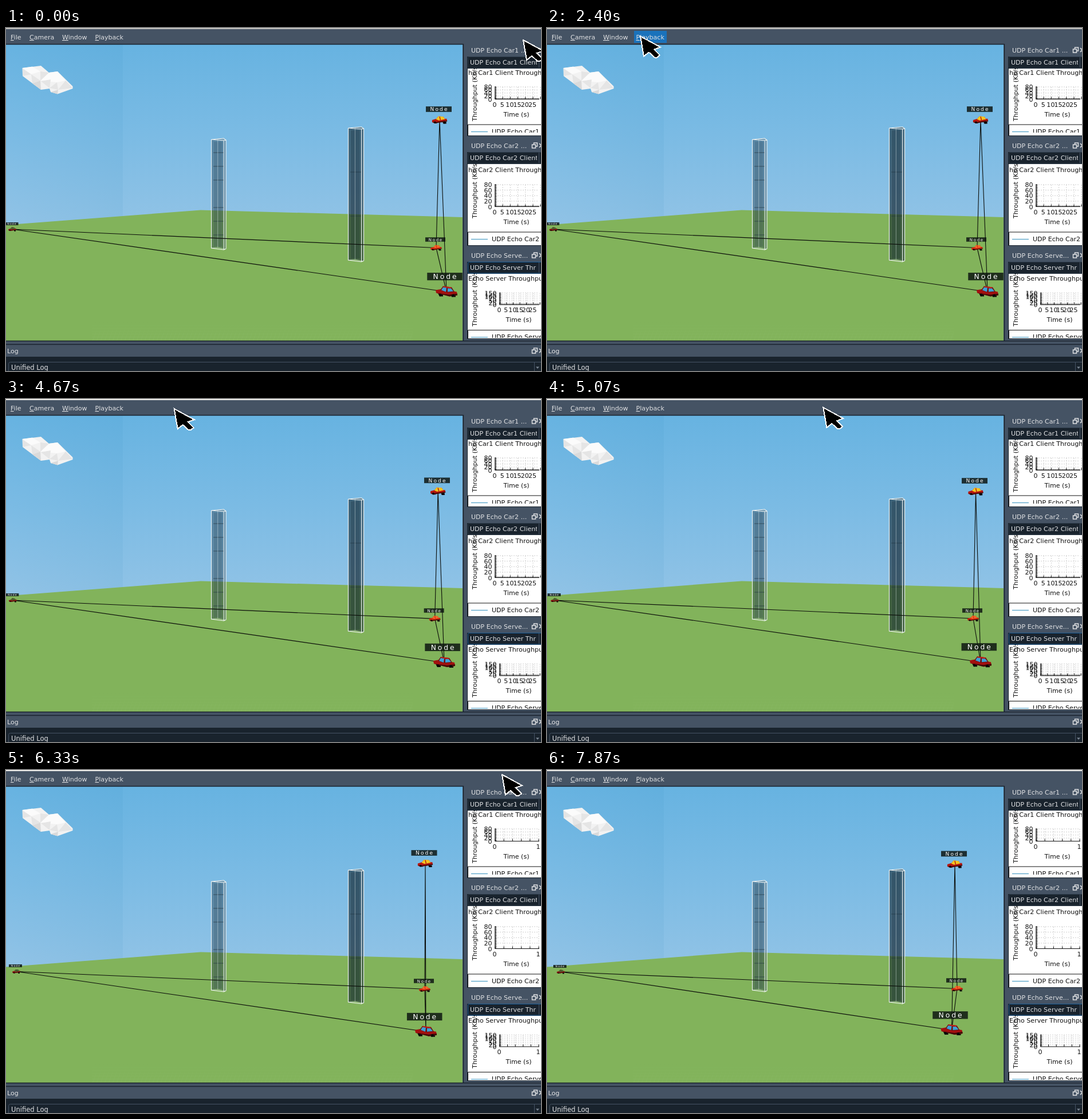
These frames come from a looping animation (934 by 600 pixels, 8 s). An HTML page:

```html
<!DOCTYPE html>
<html lang="en">
<head>
<meta charset="utf-8">
<title>Network simulation playback</title>
<style>
html, body { margin: 0; width: 100%; height: 100%; overflow: hidden; background: #455364; }
svg { display: block; }
text { font: 11.05px "DejaVu Sans", Verdana, sans-serif; white-space: pre; }
.ui text { fill: #e0e1e3; }
.chart text { fill: #111; }
.u { text-decoration: underline; }
</style>
</head>
<body>
<svg id="stage" width="934" height="600" viewBox="0 0 934 600">
  <defs>
    <linearGradient id="sky" x1="0" y1="29" x2="0" y2="345" gradientUnits="userSpaceOnUse">
      <stop offset="0" stop-color="#67b3e1"/><stop offset=".5" stop-color="#7bbbe4"/><stop offset="1" stop-color="#91c3e6"/>
    </linearGradient>
    <linearGradient id="side" x1="0" y1="0" x2="1" y2="0">
      <stop offset="0" stop-color="#1f7fb5" stop-opacity="0"/><stop offset="1" stop-color="#1f7fb5" stop-opacity=".07"/>
    </linearGradient>
    <linearGradient id="fade" x1="0" y1="0" x2="0" y2="1">
      <stop offset="0" stop-color="#fff" stop-opacity="0"/><stop offset="1" stop-color="#fff"/>
    </linearGradient>
    <pattern id="mesh" width="7" height="5" patternUnits="userSpaceOnUse" patternTransform="skewX(-20)">
      <path d="M0 0H7M0 0V5" fill="none" stroke="#98c276" stroke-width=".7"/>
    </pattern>
    <mask id="soft"><rect x="150" y="515" width="560" height="32" fill="url(#fade)"/></mask>
    <clipPath id="viewClip"><rect y="29" width="797" height="518"/></clipPath>
  </defs>

  <rect width="934" height="600" fill="#455364"/>
  <rect id="edge" width="934" height="2"/>

  <g clip-path="url(#viewClip)">
    <rect y="29" width="797" height="330" fill="url(#sky)"/>
    <rect y="29" width="204" height="320" fill="url(#side)"/>
    <path d="M0 344.5L340 318.5L797 331V547H0Z" fill="#82b35b"/>
    <rect x="150" y="515" width="560" height="32" fill="url(#mesh)" mask="url(#soft)" opacity=".5"/>
    <g id="cloud"></g>
    <g id="towers"></g>
    <path id="links" fill="none" stroke="#0a0c08" stroke-width="1.1"/>
    <g id="cars"></g>
  </g>

  <path d="M0 28.5H798.5V548M0 547.5H934M0 553.5H934" fill="none" stroke="#19232d" stroke-width="1.3"/>
  <g id="docks"></g>

  <g class="ui">
    <rect y="575" width="934" height="25" fill="#19232d"/>
    <rect x="4.5" y="584.5" width="940" height="30" rx="3" fill="#19232d" stroke="#455364"/>
    <path d="M922.5 585V600" stroke="#455364"/>
    <path d="M925 592.5H931L928 596Z" fill="#7b8794"/>
    <text x="2" y="569">Log</text>
    <text x="9" y="598" style="font-size:11.5px">Unified Log</text>
    <g id="logIcons"></g>
  </g>

  <g class="ui">
    <rect id="hot" x="152" width="57" height="21" fill="#1a72bb"/>
    <text x="8" y="20"><tspan class="u">F</tspan>ile</text>
    <text x="41" y="20"><tspan class="u">C</tspan>amera</text>
    <text x="98" y="20"><tspan class="u">W</tspan>indow</text>
    <text id="playback" x="155.5" y="20"><tspan class="u">P</tspan>layback</text>
    <g id="menu">
      <rect id="item" x="152" y="27" width="125" height="20"/>
      <text x="177" y="41">Play/Pause</text><text x="248" y="41">P</text>
    </g>
  </g>

  <path id="big" d="M0 0L6 35L15 28L25 37L29 37L34 33L24 23L35 19Z" fill="#000" stroke="#fff" stroke-width="2" shape-rendering="crispEdges"/>
  <g id="small">
    <path d="M3 3V28L9 23L14 32L18 30L14 21H22Z" fill="#000" opacity=".25"/>
    <path d="M0 0V25L6 20L11 30L15.500 28L11 18.500H19Z" fill="#464c53" stroke="#b3b8bd" stroke-width="1.200"/>
  </g>
</svg>

<script>
const $ = id => document.getElementById(id);
const show = (el, on) => el.setAttribute('visibility', on ? 'visible' : 'hidden');
const place = (el, x, y) => el.setAttribute('transform', `translate(${x.toFixed(2)} ${y.toFixed(2)})`);
const path = (d, fill, more = '') => `<path d="${d}" fill="${fill}" ${more}/>`;
const label = (x, y, s, anchor = 'start') => `<text x="${x}" y="${y}" text-anchor="${anchor}">${s}</text>`;
const range = n => Array.from({ length: n }, (_, i) => i);

// Rows are [key, ...values]; linear between rows, held at both ends.
function sample(rows, t) {
  let i = 0;
  while (i < rows.length - 2 && t >= rows[i + 1][0]) i++;
  const [a, b] = [rows[i], rows[i + 1]];
  const p = Math.min(1, Math.max(0, (t - a[0]) / (b[0] - a[0])));
  return a.slice(1).map((v, j) => v + (b[j + 1] - v) * p);
}

/* ---- scenery ---- */
$('cloud').innerHTML =
  path('M28.5 70L61 66L75 78L90 76L116.500 102V106L90 115.500L78 112L76 106L61 108L29 84Z', '#f2f2f2') +
  path('M28.5 70L44 81L60 76L46 67.500Z M60 92L75 78L90 76L104 92L89 95Z', '#fbfbfb') +
  path('M29 71V84L44 81Z M44 81L60 92L46 97Z M60 76L75 78L60 92Z M61 93L78 90L76 105Z M76 105L89 95L91 108Z M91 108L104 92L116 105Z', '#e5e5e5') +
  path('M46 97L60 92L61 108Z M78 112L91 108L90 115.500Z', '#dadada');

function tower(x, r, top, base, tint, floors) {
  const w = r - x, m = x + w * .45, n = x + w * .86;
  const slab = floors.map(y => `M${x + 4} ${y}H${r - 4}`).join('');
  return path(`M${x} ${top + 2}L${r - 4} ${top}L${r} ${top + 3}V${base}L${m} ${base - 3}L${x} ${base - 2}Z`, tint) +
    path(`M${x + 5} ${top + 6}H${r - 7}V${base - 5}H${x + 5}Z`, tint, 'opacity=".4"') +
    path(slab, 'none', 'stroke="#1f3340" stroke-width="1" opacity=".65"') +
    path(`M${m} ${top + 1}V${base - 3}L${x} ${base - 2}M${m} ${base - 3}L${r} ${base}M${m} ${top + 1}L${r} ${top + 3}`, 'none', 'stroke="#e8f0f2" stroke-width=".8" opacity=".55"') +
    path(`M${x + .5} ${top + 2}L${r - 4} ${top}L${r} ${top + 3}L${n} ${top + 4}ZV${base - 2}L${n} ${base + 1}L${r} ${base - 1}V${top + 3}M${n} ${top + 4}V${base + 1}`, 'none', 'stroke="#f0f4f4" stroke-width="1.1"');
}
$('towers').innerHTML =
  tower(358, 384, 193, 387, 'rgba(38,62,78,.42)', [218, 242, 266, 314, 338, 362]) +
  tower(597, 624.5, 173, 408, 'rgba(20,38,48,.58)', [252, 329]);

/* ---- cars: rows are [step, label x, label y, car x, car y] ---- */
const cars = [
  { w: 23, len: 14, body: '#8d1712', glass: '#3f6a35', at: [[-3, 10, 342.5, 11, 352], [0, 12.5, 342.5, 13.5, 352], [3, 14.5, 342.5, 15.5, 352], [6, 16.5, 342.5, 18, 352.5], [13, 22.5, 343.5, 24, 353]] },
  { w: 45, len: 27, body: '#b8160e', glass: '#f3c522', at: [[-3, 755.5, 142, 757, 161], [0, 746.5, 143, 748.5, 162], [3, 738.5, 144, 740, 162.5], [6, 730, 145, 732, 163.5], [13, 710.5, 146.5, 712, 165]] },
  { w: 35, len: 20, body: '#d8290f', glass: '#f0682a', at: [[-3, 749.5, 370, 751, 384.5], [0, 742.5, 370, 744, 384], [3, 735.5, 369.5, 737, 383.7], [6, 729.5, 369, 731, 383.3], [13, 714.5, 368, 716, 382.5]] },
  { w: 61.5, len: 37, body: '#a3100f', glass: '#3c9fd8', at: [[-3, 766, 434.7, 769, 461.5], [0, 754.3, 433.7, 757, 460.3], [3, 743, 432.7, 745, 459], [6, 730.7, 431.5, 733, 457.7], [13, 704, 428.8, 706.5, 455]] }
];

function carShape({ len, body, glass }) {
  const near = len > 30;
  // The near car faces left; the others are seen nearly side-on.
  const hull = near ? 'M-19 -3L-8 -5L18 0L19 6L5 8L-18 2Z' : 'M-18 0L-8 -3L17 -3L18 3L-12 8L-18 5Z';
  const cabin = near ? 'M-11 -3L-6 -10L9 -8L14 0L1 1Z' : 'M-9 -2L-3 -9L9 -8L13 -2L-2 1Z';
  const pane = near ? 'M-9 -3L-6 -8L0 -7L-1 0Z M2 -6L8 -6L12 -1L2 0Z' : cabin;
  return `<g transform="scale(${len / 37})">` +
    path('M-15 2H-6V8H-12Z M7 4H16V9H9Z', '#120c0c') +
    path(hull, body) +
    path(near ? 'M-18 2L5 5L19 3V6L5 8Z' : 'M-18 4L-12 5L18 1V3L-12 8Z', '#430908') +
    path(cabin, near ? '#6d1211' : body) + path(pane, glass) +
    path(near ? 'M-6 -10L9 -8L7 -6L-5 -8Z' : 'M-3 -9L9 -8L6 -6L-2 -6Z', near ? '#c5211b' : glass) +
    (near ? '' : path('M0 -8L2 0', 'none', `stroke="${body}" stroke-width="2"`)) +
    path('M-14 4L-10 3L-8 7L-12 8Z M9 5L13 4L14 8L10 9Z', '#080808') + '</g>';
}

const svgGroup = (parent, html) => {
  const g = document.createElementNS('http://www.w3.org/2000/svg', 'g');
  g.innerHTML = html;
  return parent.appendChild(g);
};
for (const c of cars) {
  const { w } = c, h = w * .215, size = w * .2, gap = w * .048;
  c.car = svgGroup($('cars'), carShape(c));
  c.tag = svgGroup($('cars'), `<rect x="${-w / 2}" y="${-h / 2}" width="${w}" height="${h}" fill="#0c1410" opacity=".83"/>` +
    `<text x="${gap / 2}" y="${size * .36}" text-anchor="middle" fill="#fff" style="font-size:${size}px;letter-spacing:${gap}px">Node</text>`);
}
const pairs = [[0, 2], [0, 3], [1, 2], [1, 3], [2, 3]];

/* ---- docks ---- */
const icons = y => path(`M921.500 ${y + 2.5}V${y}H927.500V${y + 6}H925M918.500 ${y + 3}H924.500V${y + 9}H918.500Z`, 'none', 'stroke="#e0e1e3" stroke-width="1.5"') +
  path(`M931 ${y + 1}L938 ${y + 8}M938 ${y + 1}L931 ${y + 8}`, 'none', 'stroke="#e0e1e3" stroke-width="1.7"');
$('logIcons').innerHTML = icons(560);

const docks = [
  { y: 29, end: 188, cut: 183, name: 'Car1 ...', tab: 'Car1 Client', head: 'ho Car1 Client Throughput', headY: 82, line: 'Car1', ax: 854, zero: 124.5, top: 103, max: 80, by: 20, gap: 13.2, side: 163, time: 891 },
  { y: 196, end: 380, cut: 380, name: 'Car2 ...', tab: 'Car2 Client', head: 'ho Car2 Client Throughput', headY: 252, line: 'Car2', ax: 854, zero: 312.5, top: 274, max: 80, by: 20, gap: 13.2, side: 333, time: 891 },
  { y: 388, end: 543, cut: 542, name: 'Serve...', tab: 'Server Thr', head: 'Echo Server Throughput', headY: 442, line: 'Server', ax: 862, zero: 484, top: 463.5, max: 150, by: 25, gap: 11.7, side: 522, time: 895 }
];

function xAxis(d, cls, ticks, gap, names) {
  const grid = ticks.map(i => `M${d.ax + i * gap} ${d.top}V${d.zero}`).join('');
  const marks = ticks.map(i => `M${d.ax + i * gap} ${d.zero}v-4`).join('');
  return `<g class="${cls}">` + path(grid, 'none', 'stroke="#cfcfcf" stroke-dasharray="2 2"') +
    path(marks, 'none', 'stroke="#111"') +
    names.map(([x, s]) => label(x, d.zero + 13, s, 'middle')).join('') + '</g>';
}

function dock(d, i) {
  const { y, ax, zero, top } = d, n = d.max / d.by, dy = (zero - top) / n;
  const rows = range(n + 1).map(j => zero - j * dy);
  const chartTop = y + 42;
  return `<g class="ui"><rect x="805" y="${y}" width="129" height="21" fill="#455364"/>` +
    label(812, y + 14, 'UDP Echo ' + d.name) + icons(y + 5) +
    `<rect x="805" y="${y + 21}" width="129" height="${d.end - y - 20}" fill="#19232d"/>` +
    `<rect class="tab" x="806.5" y="${y + 21.5}" width="140" height="19.500" rx="2" fill="#19232d" stroke="#2b3947"/>` +
    `<svg x="806" y="${y + 21}" width="121" height="20">` + label(4, 14, 'UDP Echo ' + d.tab) + '</svg>' +
    path(`M930.5 ${y + 22}v18`, 'none', 'stroke="#455364"') + '</g>' +
    `<svg class="chart" x="806" y="${chartTop}" width="128" height="${d.end - chartTop}" viewBox="806 ${chartTop} 128 ${d.end - chartTop}">` +
    `<rect x="806" y="${chartTop}" width="128" height="200" fill="#fff"/>` +
    label(807, d.headY, d.head) +
    `<text transform="translate(822 ${d.side}) rotate(-90)">Throughput (Kb/s)</text>` +
    path(rows.slice(1).map(v => `M${ax} ${v}H930`).join(''), 'none', 'stroke="#cfcfcf" stroke-dasharray="2 2"') +
    xAxis(d, 'long', range(7).filter(j => ax + j * d.gap < 934), d.gap, range(6).map(j => [ax - 1 + j * d.gap, j * 5])) +
    xAxis(d, 'unit', range(6), (930 - ax) / 5, [[ax - 1, 0], [929, 1]]) +
    path(`M${ax} ${top - 1}V${zero}H931`, 'none', 'stroke="#111" stroke-width="1.2"') +
    path(`M${ax + 1} ${top}V${zero}`, 'none', 'stroke="#111" stroke-width="3" stroke-dasharray="1 1.500"') +
    `<g class="long">` + path(`M${ax} ${zero - 1}H931`, 'none', 'stroke="#111" stroke-width="2" stroke-dasharray="1 1.640"') + '</g>' +
    rows.map((v, j) => label(ax - 5.5, v + 4, j * d.by, 'end')).join('') +
    label(d.time, zero + 30, 'Time (s)', 'middle') +
    path(`M806.5 ${d.end}V${zero + 44.5}H934`, 'none', 'stroke="#111"') +
    path(`M812 ${zero + 57}H841`, 'none', 'stroke="#4a9cc4" stroke-width="1.2"') +
    label(848, zero + 60, 'UDP Echo ' + d.line) +
    `<rect x="807" y="${d.cut}" width="128" height="9" fill="#fff"/></svg>`;
}
$('docks').innerHTML = docks.map(dock).join('');
const longAxes = document.querySelectorAll('.long'), unitAxes = document.querySelectorAll('.unit');
const focusTab = document.querySelectorAll('.tab')[2];

/* ---- pointer: rows are [ms, x, y] ---- */
const pointer = [
  [0, 903, 21], [70, 903, 21], [1730, 150, 6], [1930, 157, 15], [2130, 157, 15], [2200, 159, 15], [2400, 163, 14.5],
  [2930, 163, 14.5], [3000, 165, 15], [3330, 180, 25], [3400, 180, 25], [3470, 183, 28], [3730, 187, 32],
  [4270, 187, 32], [4470, 215, 25], [4800, 345, 12], [5070, 482.5, 15], [5200, 555, 11], [5330, 640, 4],
  [5470, 692, 3], [5530, 718.5, 4], [5800, 718.5, 4], [6330, 866, 8], [6400, 866, 8], [6930, 936, 24], [8000, 960, 30]
];

const LOOP = 8000, TICK = 200 / 3, start = performance.now();

function draw(t) {
  const tick = Math.floor((t + 5) / TICK) * TICK;
  const step = Math.max(-3, Math.floor((tick - 4970) / 220));

  const pos = cars.map(c => {
    const [lx, ly, x, y] = sample(c.at, step);
    place(c.tag, lx, ly);
    place(c.car, x, y);
    return [x, y];
  });
  $('links').setAttribute('d', pairs.map(([a, b]) => `M${pos[a]}L${pos[b]}`).join(''));

  const open = t >= 2800 && t < 4330;
  show($('hot'), t >= 2200 && t < 4330);
  $('hot').setAttribute('y', open ? 6 : 5);
  $('playback').setAttribute('y', open ? 22 : 20);
  show($('menu'), open);
  $('item').setAttribute('fill', t >= 3400 ? '#1a72bb' : '#455364');
  $('edge').setAttribute('fill', t >= 2800 ? '#ecebe8' : '#c3c2bf');
  focusTab.setAttribute('stroke', t < 70 || t >= 3200 ? '#1a5f99' : '#2b3947');

  const unit = t >= 6130;
  longAxes.forEach(g => show(g, !unit));
  unitAxes.forEach(g => show(g, unit));

  const [x, y] = sample(pointer, tick + 3);
  const grey = t >= 5470 && t < 5870;
  show($('big'), !grey && (t < 70 || t >= 1730) && t < 7200);
  show($('small'), grey);
  place($('big'), x, y);
  place($('small'), x, y);
}

function loop() {
  draw((performance.now() - start) % LOOP);
  requestAnimationFrame(loop);
}
loop();
</script>
</body>
</html>
```
